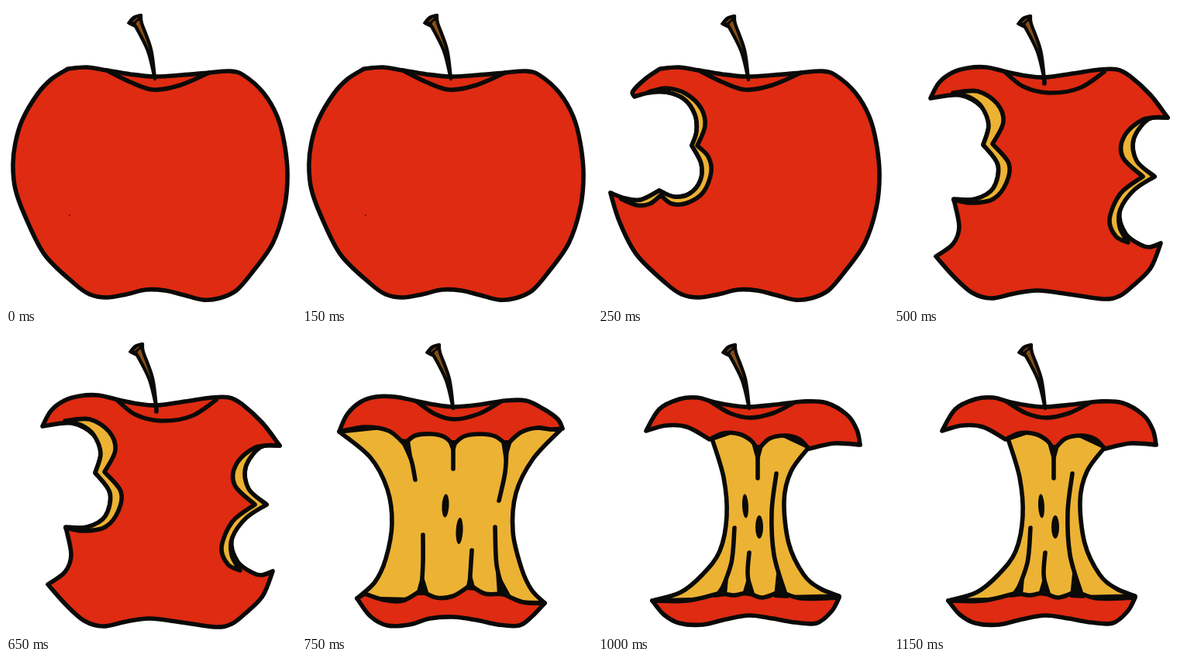
These frames come from a looping animation (374x387 px, 1250 ms). An HTML page with a canvas:

```html
<!DOCTYPE html>
<html lang="en">
<head>
<meta charset="utf-8">
<title>Apple being eaten</title>
<style>
html, body { margin: 0; height: 100%; overflow: hidden; background: #fff; }
canvas { display: block; width: 100vw; height: 100vh; }
</style>
</head>
<body>
<canvas width="374" height="387"></canvas>
<script>
const ctx = document.querySelector("canvas").getContext("2d");
const ink = "#0a0a08", brown = "#8a4f18";

// Smooth curve through the points; a slash makes the point before it a corner.
function trace(text) {
  let last = null;
  ctx.beginPath();
  for (const run of text.split("/")) {
    const nums = run.match(/\d+/g).map(Number);
    const pts = last ? [last] : [];
    for (let i = 0; i < nums.length; i += 2) pts.push([nums[i], nums[i + 1]]);
    if (!last) ctx.moveTo(...pts[0]);
    for (let i = 0; i < pts.length - 1; i++) {
      const [a, b] = [pts[i], pts[i + 1]];
      const before = pts[i - 1] || a, after = pts[i + 2] || b;
      ctx.bezierCurveTo(
        a[0] + (b[0] - before[0]) / 6, a[1] + (b[1] - before[1]) / 6,
        b[0] - (after[0] - a[0]) / 6, b[1] - (after[1] - a[1]) / 6, ...b);
    }
    last = pts[pts.length - 1];
  }
}

function line(text, color = ink, width = 5.6) {
  trace(text);
  ctx.strokeStyle = color;
  ctx.lineWidth = width;
  ctx.stroke();
}

function fill(text, color, width = 5.6) {
  trace(text);
  ctx.closePath();
  ctx.fillStyle = color;
  ctx.fill();
  ctx.strokeStyle = ink;
  ctx.lineWidth = width;
  ctx.stroke();
}

const red = text => fill(text, "#de2b12");
const flesh = text => fill(text, "#ecb233");
const wedge = text => fill(text, ink, 2);

function seed(x, y, rx, ry, tilt) {
  ctx.beginPath();
  ctx.ellipse(x, y, rx, ry, tilt, 0, 2 * Math.PI);
  ctx.fillStyle = ink;
  ctx.fill();
}

function stem(dx, dy) {
  ctx.save();
  ctx.translate(dx, dy);
  fill("159 22 165 15 174 12 / 175 22 187 56 192 94 / 183 58 167 26", brown, 4.4);
  wedge("157 22 164 14 174 11 / 175 17 169 19 165 26");
  line("164 20 / 169 16", brown, 1.5);
  ctx.restore();
}

const crown = "80 81 104 79 130 83 160 88 192 91 227 89 262 86 288 84 306 89 ";
const flank = "332 112 350 143 359 177 363 218 359 260 344 306 318 343 ";
const foot = "297 367 275 377 254 379 230 373 205 367 180 366 155 372 130 376 108 372 88 358 ";
const dip = "130 83 160 98 190 108 225 102 262 86";

function whole() {
  red(crown + flank + foot + "50 321 25 272 12 236 9 205 12 177 21 147 41 113 59 94 80 81");
  line(dip);
  ctx.fillStyle = "#7a1a0c";
  ctx.fillRect(81, 269, 2, 2);
  stem(0, 0);
}

function firstBite() {
  const bite = "/ 35 248 55 250 79 238 / 98 246 118 242 132 225 133 203 121 180 " +
    "/ 127 162 125 140 111 120 88 111 65 112 47 117 / 45 110 61 94 80 81";
  red(crown + flank + foot + "50 321 28 279 16 241" + bite);
  flesh("65 111 88 106 113 113 133 132 138 155 128 180 / 142 194 146 214 136 240 115 254 95 255 81 244 " +
    "/ 67 255 50 257 30 249 / 55 250 79 238 / 98 246 118 242 132 225 133 203 121 180 " +
    "/ 127 162 125 140 111 120 88 111 65 111");
  line(dip);
  stem(2, 1);
}

function bothSides() {
  const top = "47 119 58 99 75 86 95 80 119 79 145 85 170 90 195 92 231 87 265 82 288 82 305 91 331 115 353 144";
  const right = "/ 328 146 309 172 313 200 336 220 / 308 237 291 266 299 294 318 308 330 311 344 306";
  const base = "/ 331 338 308 361 291 374 270 378 227 372 185 367 155 371 125 377 101 370 78 350 54 323";
  const left = "/ 76 307 84 285 77 249 / 105 249 128 235 134 205 115 179 / 122 154 113 130 85 115 47 119";
  red(top + right + base + left);
  flesh("76 112 108 110 133 126 141 150 127 178 / 148 203 145 228 128 249 100 254 77 250 " +
    "/ 105 249 128 235 134 205 115 179 / 122 154 113 130 98 118 76 112");
  flesh("353 144 322 146 297 168 295 195 321 220 / 292 242 278 275 286 297 302 305 " +
    "/ 291 285 292 262 310 237 336 220 / 313 200 309 172 328 146 353 144");
  line("143 85 167 104 200 112 239 106 271 85");
  line("194 92 / 194 100");
  stem(2, 1);
}

function fleshy() {
  flesh("48 126 88 159 110 200 116 245 108 290 94 320 71 341 / 313 347 " +
    "/ 296 330 283 302 272 255 276 205 298 161 333 124 / 200 110");
  red("48 126 58 104 75 88 95 81 120 81 145 86 170 91 196 94 230 91 262 86 289 86 312 97 330 110 336 122 " +
    "/ 321 123 303 121 282 127 264 143 / 249 132 230 129 209 132 195 143 " +
    "/ 184 133 168 129 146 131 132 142 / 112 125 81 120 48 126");
  red("71 341 81 335 / 105 343 130 344 153 331 / 173 340 195 338 217 324 / 236 335 259 335 / 285 346 313 347 " +
    "/ 297 364 280 376 253 375 225 369 195 365 165 367 138 375 110 376 88 364 71 341");
  line("148 87 171 103 196 110 228 103 255 88");
  line("132 142 141 163 146 188");
  line("195 143 / 195 174");
  line("264 143 262 178 254 215");
  line("156 259 156 295 154 331");
  line("219 279 / 216 325");
  line("249 249 251 298 260 332");
  wedge("127 136 / 138 137 / 142 164");
  wedge("189 138 / 200 138 / 195 154");
  wedge("258 138 / 270 138 / 262 165");
  wedge("155 310 / 148 336 / 163 336");
  wedge("217 308 / 212 329 / 223 330");
  wedge("251 306 / 253 337 / 269 339");
  seed(185, 221.5, 4.5, 15, 0.05);
  seed(203, 254, 4.5, 17, 0.05);
  stem(3, 2);
}

function core() {
  flesh("147 135 162 185 166 235 157 280 135 310 107 333 70 344 / 311 338 " +
    "/ 286 328 265 310 246 270 240 215 249 177 272 146 / 206 115");
  red("62 125 79 97 105 84 128 82 150 88 172 92 196 94 230 91 265 87 295 89 322 105 334 124 338 143 " +
    "/ 305 141 272 148 / 260 136 243 131 221 135 206 150 " +
    "/ 198 138 182 129 162 128 144 136 / 115 120 88 118 62 125");
  red("70 344 115 344 158 334 / 175 337 193 333 / 212 340 235 332 / 262 341 311 340 " +
    "/ 301 358 282 373 254 372 225 367 195 363 165 368 135 375 105 373 85 362 70 344");
  line("145 87 170 102 196 108 226 102 252 89");
  line("206 150 / 206 186");
  line("230 180 224 230 227 285 241 333");
  line("176 250 172 295 158 334");
  line("195 282 193 308 196 333");
  wedge("200 144 / 212 144 / 206 166");
  wedge("167 315 / 150 339 / 165 337");
  wedge("194 312 / 187 336 / 202 338");
  wedge("231 309 / 228 339 / 245 340");
  seed(190, 222, 4, 15.5, -0.05);
  seed(208, 249, 5, 15, 0);
  stem(3, 2);
}

const poses = [whole, firstBite, bothSides, fleshy, core];
const hold = 250;
const start = performance.now();
ctx.lineCap = ctx.lineJoin = "round";

function draw(now) {
  const step = Math.floor(Math.max(0, now - start) / hold) % poses.length;
  ctx.clearRect(0, 0, 374, 387);
  poses[step]();
  requestAnimationFrame(draw);
}
draw(start);
</script>
</body>
</html>
```
